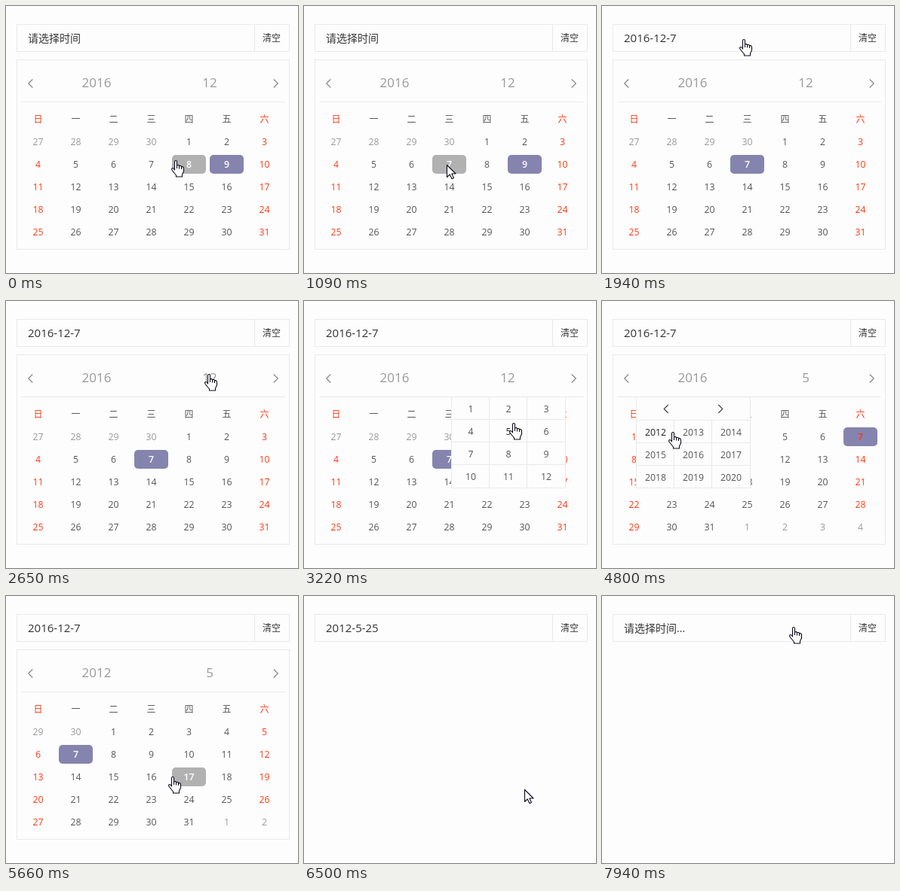
An HTML page with a canvas for the animation above (8000 ms loop, 387 by 355 pixels).

```html
<!DOCTYPE html>
<html lang="zh-CN">
<head>
<meta charset="utf-8">
<title>日期选择</title>
<style>
html, body { margin: 0; width: 100%; height: 100%; overflow: hidden; background: #fdfdfd; }
canvas { display: block; }
</style>
</head>
<body>
<canvas id="stage" width="387" height="355"></canvas>
<script>
const ctx = document.getElementById('stage').getContext('2d');
const FONT = '"Open Sans", "Noto Sans CJK SC", "Noto Sans CJK", sans-serif';
const LOOP = 8000;
const BG = '#fdfdfd', LINE = '#e9e9e9', TEXT = '#555', MUTED = '#999', RED = '#ff3a14';
const SELECTED = '#8584ae', HOVER = '#b1b1b1';

const smooth = u => u * u * (3 - 2 * u);
const linear = u => u;
const settle = u => 1 - Math.pow(1 - u, 2.4);
const power = n => u => Math.pow(u, n);

// Pointer moves: start, end, number of poses, from, to, easing
const moves = [
  [120, 840, 7, [224, 205], [189, 211], smooth],
  [1090, 1810, 7, [189, 211], [188, 45], power(3)],
  [1940, 2650, 7, [187, 44], [268, 97], smooth],
  [2860, 3460, 6, [268, 97], [278, 170], settle],
  [3710, 4190, 5, [278, 170], [120, 97], smooth],
  [4440, 5040, 6, [120, 97], [90, 184], settle],
  [5290, 5900, 6, [90, 184], [290, 271], smooth],
  [6140, 6840, 7, [290, 271], [329, 53], power(4)],
  [6960, 7080, 2, [337, 42], [345, 45], linear],
  [7580, 7940, 4, [345, 45], [253, 41], smooth]
];

// State changes, each kept until overridden
const changes = [
  [0, { year: 2016, month: 12, day: 9, value: '请选择时间', open: true, popup: '', click: false }],
  [1090, { click: true }],
  [1210, { day: 7, value: '2016-12-7', open: false }],
  [1940, { open: true, click: false }],
  [2860, { popup: 'month' }],
  [3710, { popup: '', month: 5 }],
  [4440, { popup: 'year' }],
  [5290, { popup: '', year: 2012 }],
  [6140, { click: true }],
  [6257, { day: 25, value: '2012-5-25', open: false }],
  [7580, { value: '请选择时间...' }]
];

function stateAt(t) {
  return Object.assign({}, ...changes.filter(c => c[0] <= t).map(c => c[1]));
}

function pointerAt(t) {
  const move = moves.filter(m => m[0] <= t).pop();
  if (!move) return moves[0][3];
  const [start, end, poses, from, to, ease] = move;
  const last = poses - 1;
  const pose = Math.min(last, Math.floor((t - start) / (end - start) * last + 0.01));
  const p = ease(pose / last);
  return from.map((v, i) => Math.round(v + (to[i] - v) * p));
}

function text(str, x, y, size, color, align = 'center', weight = 400) {
  ctx.font = `${weight} ${size}px ${FONT}`;
  ctx.fillStyle = color;
  ctx.textAlign = align;
  ctx.fillText(str, x, y);
}

function stroke(points, color = LINE, width = 1) {
  ctx.beginPath();
  points.forEach(([x, y]) => ctx.lineTo(x, y));
  ctx.strokeStyle = color;
  ctx.lineWidth = width;
  ctx.stroke();
}

function frame(x, y, w, h) {
  ctx.fillStyle = BG;
  ctx.fillRect(x, y, w, h);
  ctx.strokeStyle = LINE;
  ctx.lineWidth = 1;
  ctx.strokeRect(x + 0.5, y + 0.5, w - 1, h - 1);
}

function chevron(x, y, dir, size, color) {
  stroke([[x - dir * size / 2, y - size], [x + dir * size / 2, y], [x - dir * size / 2, y + size]], color, 1.2);
}

function drawInput(value) {
  frame(14, 24, 362, 37);
  stroke([[329.5, 24], [329.5, 61]]);
  const isDate = /^\d/.test(value);
  text(value, 29, 48, isDate ? 15 : 14, '#333', 'left');
  text('清空', 352, 46.5, 12, '#333');
}

function hoveredCell([x, y], s) {
  if (s.popup) return -1;
  const col = Math.floor((x - 17) / 50), row = Math.floor((y - 166) / 30);
  return col >= 0 && col < 7 && row >= 0 && row < 5 ? row * 7 + col : -1;
}

function drawCalendar(s, hover) {
  frame(14, 71, 362, 253);
  text(s.year, 120, 108, 17, MUTED);
  text(s.month, 270, 108, 17, MUTED);
  chevron(32.5, 103, -1, 5.5, '#888');
  chevron(357.5, 103, 1, 5.5, '#888');
  stroke([[20, 127.5], [370, 127.5]]);
  [...'日一二三四五六'].forEach((name, i) =>
    text(name, 42.5 + 50 * i, 155, 12, i % 6 ? TEXT : RED));

  const offset = new Date(s.year, s.month - 1, 1).getDay();
  for (let i = 0; i < 35; i++) {
    const date = new Date(s.year, s.month - 1, 1 + i - offset);
    const inside = date.getMonth() === s.month - 1;
    const chosen = inside && date.getDate() === s.day;
    const col = i % 7, x = 20 + 50 * col, y = 168 + 30 * Math.floor(i / 7);
    const marked = chosen || i === hover;
    if (marked) {
      ctx.fillStyle = chosen ? SELECTED : HOVER;
      ctx.beginPath();
      ctx.roundRect(x, y, 45, 25, 5);
      ctx.fill();
    }
    const color = inside && col % 6 === 0 ? RED : marked ? '#fff' : inside ? TEXT : MUTED;
    text(date.getDate(), x + 22.5, y + 17, 12.3, color, 'center', marked ? 600 : 400);
  }
}

function drawPopup(kind, [px, py]) {
  const years = kind === 'year';
  const left = years ? 45 : 195, top = years ? 158 : 127, rows = years ? 3 : 4;
  frame(left, 127, 152, 122);
  if (years) {
    chevron(85, 143.5, -1, 5.5, '#444');
    chevron(157, 143.5, 1, 5.5, '#444');
    stroke([[left, 158.5], [left + 152, 158.5]]);
  }
  for (let r = 1; r < rows; r++) {
    const y = top + 30 * r + 0.5;
    stroke([[left, y], [left + 152, y]]);
  }
  for (const c of [1, 2]) {
    const x = left + 50 * c + 0.5;
    stroke([[x, top], [x, 248]]);
  }
  for (let i = 0; i < rows * 3; i++) {
    const x = left + 50 * (i % 3), y = top + 30 * Math.floor(i / 3);
    const over = px >= x && px < x + 50 && py >= y && py < y + 30;
    text((years ? 2012 : 1) + i, x + 26, y + 21, 12.3, over ? '#222' : TEXT);
  }
}

const arrowShape = new Path2D('M.5 .5V16.5L4.2 13L7 18.7L9.5 17.5L6.8 12H12Z');
const handShape = new Path2D('M4.5 2Q4.5 .5 6 .5T7.5 2V7Q10 5.8 10.5 7.8Q13 6.8 13.5 8.8Q16.5 8 16.5 11V15L14.5 19V22H6.5V20L1.2 13.5Q-.3 11 1.8 10.5Q3.3 10.5 4.5 13Z');
const handFolds = new Path2D('M7.5 7V11M10.5 7.8V11.5M13.5 8.8V12');

function drawPointer([x, y], hand) {
  ctx.save();
  ctx.translate(hand ? x - 5 : x, y);
  ctx.lineWidth = 1.1;
  ctx.lineJoin = 'round';
  ctx.fillStyle = '#fff';
  ctx.strokeStyle = '#0a0a18';
  const shape = hand ? handShape : arrowShape;
  ctx.fill(shape);
  ctx.stroke(shape);
  if (hand) ctx.stroke(handFolds);
  ctx.restore();
}

function usesHand([x, y], s, hover) {
  if (s.open && s.click) return false;
  if (y >= 24 && y <= 61) return true;
  if (!s.open) return false;
  const onTitle = y >= 86 && y < 120 && (Math.abs(x - 120) < 40 || Math.abs(x - 270) < 40);
  return Boolean(s.popup) || onTitle || hover >= 0;
}

function draw(t) {
  const s = stateAt(t), pointer = pointerAt(t);
  const hover = s.open ? hoveredCell(pointer, s) : -1;
  ctx.fillStyle = BG;
  ctx.fillRect(0, 0, 387, 355);
  drawInput(s.value);
  if (s.open) drawCalendar(s, hover);
  if (s.popup) drawPopup(s.popup, pointer);
  drawPointer(pointer, usesHand(pointer, s, hover));
}

const began = performance.now();
function tick() {
  draw((performance.now() - began) % LOOP);
  requestAnimationFrame(tick);
}
tick();
</script>
</body>
</html>
```
